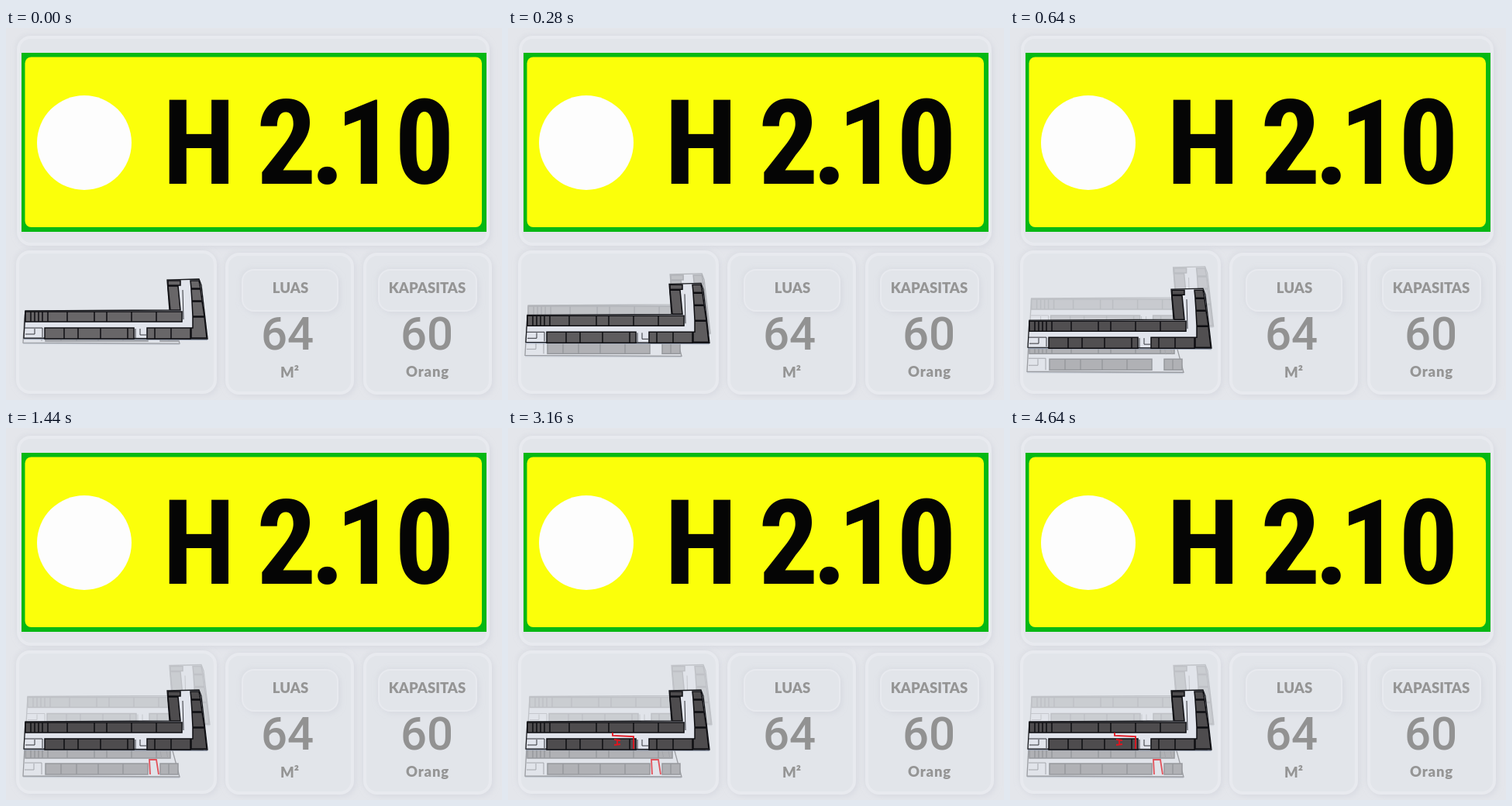
Animation of 640x480 px, one loop 5120 ms. Source, as an HTML page:

```html
<!DOCTYPE html>
<html lang="id">
<head>
<meta charset="utf-8">
<title>H 2.10</title>
<style>
  html, body { margin: 0; width: 100%; height: 100%; overflow: hidden; background: #e2e5ea; }
  svg { display: block; width: 640px; height: 480px; }
  .raised { fill: #e2e5ea; stroke: #e8eaef; stroke-width: 8; paint-order: stroke; filter: url(#raise); }
  .pill { stroke-width: 4; }
  .plate { font: 600 153px "Roboto Condensed", Roboto, sans-serif; font-stretch: 75%; }
  .label { font: 900 18.5px Lato, sans-serif; fill: #959595; }
  .value { font: 500 60px Roboto, sans-serif; fill: #929292; }
  .plate, .label, .value { text-anchor: middle; }
  .route { fill: none; stroke: #e3141e; stroke-width: 1.8; }
</style>
</head>
<body>
<svg viewBox="0 0 640 480">
  <defs>
    <filter id="raise" x="-20%" y="-20%" width="140%" height="140%">
      <feDropShadow dx="-3" dy="-3" stdDeviation="2" flood-color="#d6d9e0" flood-opacity=".35"/>
      <feDropShadow dx="3" dy="3" stdDeviation="3" flood-color="#cfd2da" flood-opacity=".5"/>
    </filter>
  </defs>
  <rect width="640" height="480" fill="#e4e6eb"/>
  <rect class="raised" x="18" y="14" width="602" height="263" rx="14"/>
  <rect class="raised" x="17" y="291" width="251" height="177" rx="14"/>
  <rect class="raised" x="287" y="294" width="158" height="175" rx="14"/>
  <rect class="raised" x="465" y="294" width="158" height="175" rx="14"/>
  <rect class="raised pill" x="306" y="313" width="121" height="51" rx="14"/>
  <rect class="raised pill" x="482" y="313" width="124" height="51" rx="14"/>

  <rect x="20" y="32" width="600" height="231" fill="#05b814"/>
  <rect x="24.5" y="37.5" width="589.5" height="219.5" rx="8" fill="#fbff0a"/>
  <circle cx="101" cy="148" r="61" fill="#fdfdfd"/>
  <text class="plate" y="201" x="249 300 362 415 464 540" fill="#050505">H 2.10</text>

  <text class="label" x="367" y="342">LUAS</text>
  <text class="value" x="363" y="415">64</text>
  <text class="label" x="366" y="451">M²</text>
  <text class="label" x="543.5" y="342">KAPASITAS</text>
  <text class="value" x="543" y="415">60</text>
  <text class="label" x="544" y="450" letter-spacing=".8">Orang</text>

  <g id="lower"></g>
  <g id="upper"></g>
  <g id="middle"></g>
  <path id="lowerRoute" class="route" pathLength="1" stroke-dasharray="1" opacity=".7"
    d="M186 447L185 428H194L197 447"/>
  <path id="route" class="route" pathLength="1" stroke-dasharray="1" d="M162 414V398L135 397V393"/>
  <path id="marker" class="route" d="M137 402L145 403M141 402V409M137 409L145 408"/>
</svg>
<script>
const LOOP = 5120;
const el = id => document.getElementById(id);
const clamp = v => Math.max(0, Math.min(1, v));
const span = (t, from, to) => clamp((t - from) / (to - from));
const lerp = (a, b, p) => a + (b - a) * p;

// A row of rooms between neighbouring wall positions
const row = (walls, top, bottom) => walls.slice(1).map((right, i) =>
  `M${walls[i]} ${top}H${right}V${bottom}H${walls[i]}Z`).join('');

const floor = (outline, rooms, details) => `
  <path d="${outline}" transform="translate(0 2)" fill="#98a1b2"/>
  <path d="${outline}" fill="#e1e4ec" stroke="#17181c" stroke-width="1.3"/>
  <path d="${rooms}" class="rooms" fill="#555355" stroke="#0e0e12" stroke-width="1.5"/>
  <path d="${details}" fill="none" stroke="#33343a"/>`;

const northWalls = [25, 32, 37, 42, 47, 54, 79, 114, 130, 162, 194];
const wholeFloor = floor(
  'M25 379L211 378L208 339L249 338L252 346L260 415L23 414Z',
  row([...northWalls, 227], 380, 393) +
  row([50, 75, 93, 122, 157, 165], 401, 415) + row([182, 192, 213, 238], 401, 415) +
  'M209 340H225V346H209ZM209 347H222L225 378H212Z' +
  'M238 340H249L251 350H239ZM239 351H251L253 366H240ZM240 367H253L256 386H241ZM241 387H256L259 414H239V401H241Z',
  'M24 401H47V413M37 402V409H25M167 402V414M173 402V410H181M228 352L229 390');
const shortFloor = floor(
  'M24 413H214L224 450L22 449Z',
  row([...northWalls, 212], 415, 426) +
  row([51, 71, 91, 119, 151, 183], 433, 447) + row([199, 210, 222], 433, 447),
  'M24 432H46V447M36 433V441H24M199 417L201 427M207 417L209 427');

el('middle').innerHTML = el('upper').innerHTML = wholeFloor;
el('lower').innerHTML = shortFloor;
const middleRooms = el('middle').querySelector('.rooms');

function place(id, x, y, opacity) {
  el(id).setAttribute('transform', `translate(${x} ${y})`);
  el(id).setAttribute('opacity', opacity);
}

function reveal(id, p) {
  el(id).setAttribute('stroke-dashoffset', 1 - p);
  el(id).setAttribute('visibility', p > 0 ? 'visible' : 'hidden');
}

function draw(now) {
  const t = now % LOOP;
  const spread = span(t, 0, 740);
  place('middle', 0, lerp(-14, 0, spread), 1);
  place('upper', 3 * spread, lerp(-14, -32.5, spread), lerp(.28, .16, spread));
  place('lower', 0, lerp(-43, 0, spread), .35);
  const shade = lerp(104, 78, spread);
  middleRooms.setAttribute('fill', `rgb(${shade},${shade - 2},${shade})`);

  reveal('lowerRoute', span(t, 920, 1000));
  reveal('route', span(t, 1600, 1960));
  el('marker').setAttribute('opacity', span(t, 1960, 2120));
  requestAnimationFrame(() => draw(performance.now()));
}
draw(0);
</script>
</body>
</html>
```
